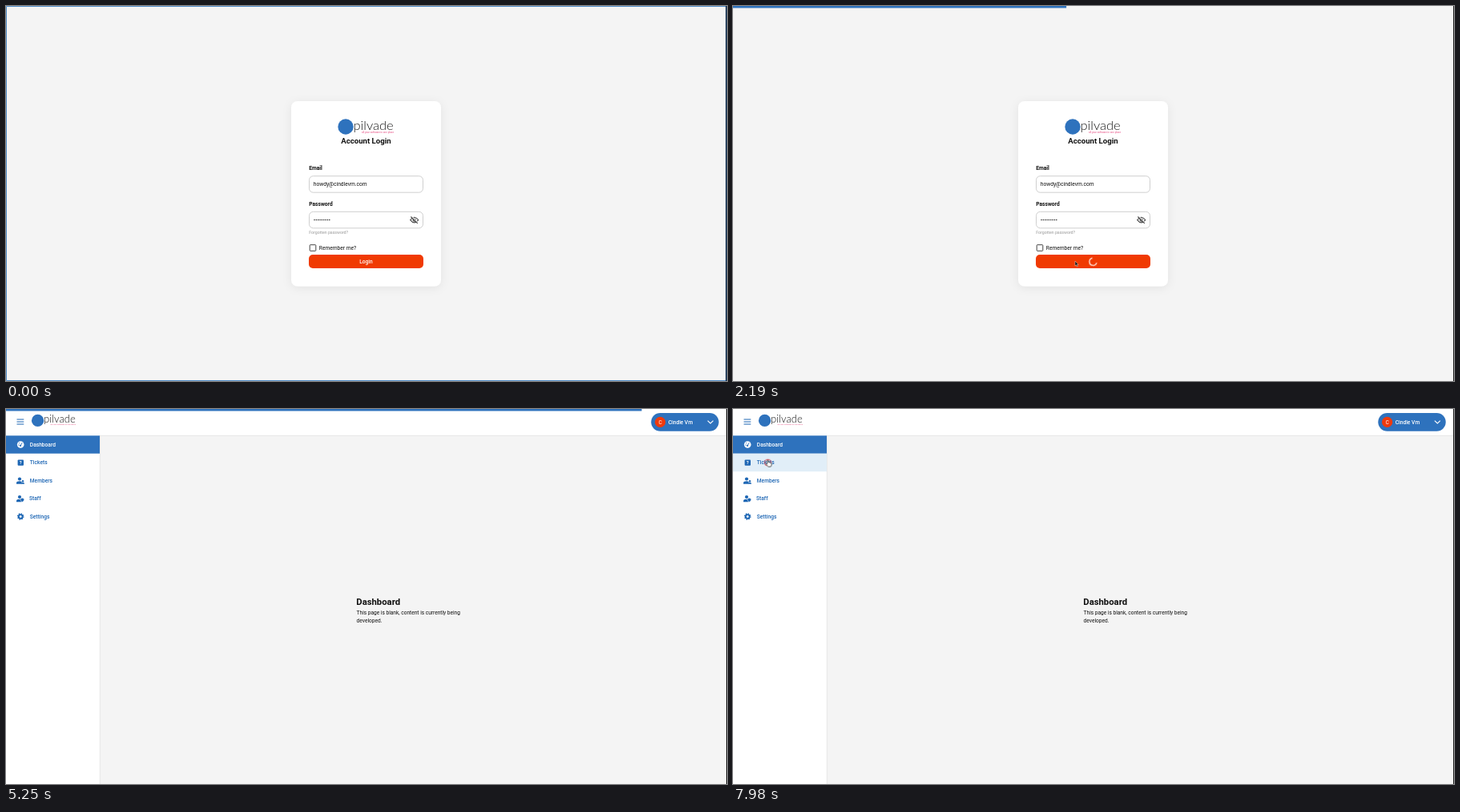
These frames come from a looping animation (900 px wide and 469 px high, 8000 ms). An HTML page:

```html
<!DOCTYPE html>
<html lang="en">
<head>
<meta charset="utf-8">
<title>Account login</title>
<style>
html, body { margin: 0; width: 100%; height: 100%; overflow: hidden; background: #f4f4f4; }
svg { display: block; width: 100vw; height: 100vh; }
text { font: 6.65px Roboto, Arial, sans-serif; fill: #111; white-space: pre; }
.b { font-weight: 700; }
.m { font-weight: 500; }
.word { font: 300 16.5px Lato, sans-serif; fill: #1c1c1c; }
.tag { font-size: 3.1px; fill: #e5487f; }
.blue { fill: #2e72bd; }
.link { font-weight: 500; fill: #1d66b4; }
.white { fill: #fff; }
.field { fill: #fff; stroke: #cfcfcf; }

/* one loop is 8 s, so 1% is 80 ms */
.a { animation: 8s linear infinite; }
.cut { animation: 8s step-end infinite; }

#login { animation-name: login; }
@keyframes login { 0% { visibility: visible } 59%, 100% { visibility: hidden } }
#home { animation-name: home; }
@keyframes home { 0% { visibility: hidden } 59%, 100% { visibility: visible } }
#edge { animation-name: edge; }
@keyframes edge { 0% { visibility: visible } 24.4%, 100% { visibility: hidden } }

#label { animation-name: label; }
@keyframes label { 0% { opacity: 1 } 24.4%, 100% { opacity: 0 } }
#busy { animation-name: busy; }
@keyframes busy { 0% { opacity: 0 } 24.4%, 100% { opacity: 1 } }
#spin { animation-name: spin; }
@keyframes spin { from { transform: rotate(-1811deg) } to { transform: rotate(1688deg) } }
#button { animation-name: button; }
@keyframes button {
  0%, 12% { fill: #f03a02 }
  15%, 24% { fill: #f4522a }
  26%, 100% { fill: #f03a02 }
}

#bar { animation-name: bar; }
@keyframes bar {
  0%, 24.4% { transform: scaleX(0); animation-timing-function: ease-out }
  33.75% { transform: scaleX(.983) }
  42.5%, 58.99% { transform: scaleX(1) }
  59% { transform: scaleX(.3); animation-timing-function: ease-out }
  65.6% { transform: scaleX(.881) }
  72%, 100% { transform: scaleX(1) }
}
#barFade { animation-name: barFade; }
@keyframes barFade { 0%, 74.2% { opacity: 1 } 75%, 100% { opacity: 0 } }

#staff { animation-name: staff; }
@keyframes staff { 0%, 83.8% { opacity: 0 } 84.6%, 87.3% { opacity: 1 } 89%, 100% { opacity: 0 } }
#members { animation-name: members; }
@keyframes members { 0%, 87.3% { opacity: 0 } 88.5%, 90.5% { opacity: 1 } 92%, 100% { opacity: 0 } }
#tickets { animation-name: tickets; }
@keyframes tickets { 0%, 90.5% { opacity: 0 } 92.5%, 100% { opacity: 1 } }

#px { animation-name: px; }
@keyframes px {
  0%, 3.75% { transform: translateX(3px); animation-timing-function: ease-in-out }
  12.5% { transform: translateX(418px); animation-timing-function: ease-out }
  16.5%, 23.6% { transform: translateX(425px) }
  26%, 65.9% { transform: translateX(427px); animation-timing-function: ease-in-out }
  73.5% { transform: translateX(852px) }
  75.4%, 76.25% { transform: translateX(853px); animation-timing-function: ease-in-out }
  84.4% { transform: translateX(60px); animation-timing-function: ease-out }
  92%, 100% { transform: translateX(43.5px) }
}
#py { animation-name: py; }
@keyframes py {
  0%, 3.75% { transform: translateY(3px); animation-timing-function: ease-in-out }
  12.5% { transform: translateY(316px) }
  16.5%, 23.6% { transform: translateY(317.5px) }
  26%, 65.9% { transform: translateY(319px); animation-timing-function: ease-in-out }
  73.5% { transform: translateY(48px) }
  75.4%, 76.25% { transform: translateY(49.5px); animation-timing-function: ease-in-out }
  80.5% { transform: translateY(246px); animation-timing-function: ease-in-out }
  84.4% { transform: translateY(115px) }
  89% { transform: translateY(86px); animation-timing-function: ease-out }
  93%, 100% { transform: translateY(63.8px) }
}
#pointer { animation-name: pointer; }
@keyframes pointer { 0% { opacity: 0 } 3.75% { opacity: 1 } 44.4% { opacity: 0 } 65.9%, 100% { opacity: 1 } }
#arrow { animation-name: arrow; }
@keyframes arrow { 0% { opacity: 1 } 12.2% { opacity: 0 } 25% { opacity: 1 } 83.6%, 100% { opacity: 0 } }
#hand { animation-name: hand; }
@keyframes hand { 0% { opacity: 0 } 12.2% { opacity: 1 } 25% { opacity: 0 } 83.6%, 100% { opacity: 1 } }
#ring { animation-name: ring; }
@keyframes ring { 0% { opacity: 0 } 23.6% { opacity: 1 } 25.5% { opacity: 0 } 99%, 100% { opacity: 1 } }
</style>
</head>
<body>
<svg viewBox="0 0 900 469">
  <defs>
    <filter id="soft" x="-20%" y="-20%" width="140%" height="140%">
      <feDropShadow dx="0" dy="2" stdDeviation="6" flood-color="#000" flood-opacity=".07"/>
    </filter>
    <g id="brand">
      <circle cx="10" cy="10" r="9.7" class="blue"/>
      <text class="word" x="19.5" y="13.5">pilvade</text>
      <text class="tag" x="30" y="17.6">all your software in one place</text>
    </g>
    <g id="person">
      <circle cx="-1" cy="-2.2" r="2.1"/>
      <path d="M-5 4V2.6Q-5 .6-1 .6 1 .6 1.6 1.2V4Z"/>
    </g>
  </defs>

  <rect width="900" height="469" fill="#f4f4f4"/>

  <g id="login" class="cut">
    <rect x="356" y="119" width="187" height="231.5" rx="8" fill="#fff" filter="url(#soft)"/>
    <use href="#brand" x="414" y="141"/>
    <text class="b" x="449.5" y="172" text-anchor="middle" style="font-size:9.6px">Account Login</text>

    <text class="b" x="378.3" y="205.3">Email</text>
    <rect class="field" x="378.5" y="212.7" width="142" height="20.5" rx="5"/>
    <text x="383.8" y="225.4">howdy@cindlevm.com</text>

    <text class="b" x="378.3" y="249.8">Password</text>
    <rect class="field" x="378.5" y="257.3" width="142" height="20.5" rx="5"/>
    <path d="M385 267.4H404" stroke="#222" stroke-width="1.5" stroke-linecap="round" stroke-dasharray="0 2.35"/>
    <g transform="translate(509.7 267.6)" fill="none" stroke="#444" stroke-width="1.1">
      <path d="M-5 0Q0-6.6 5 0 0 6.6-5 0Z"/>
      <circle r="1.6"/>
      <path d="M-3.6-4.6 4.6 3.6" stroke="#fff"/>
      <path d="M-4.2-4 4-4.2" stroke="none"/>
      <path d="M-4.3-4.1 4.1 4.3"/>
    </g>
    <text x="378.3" y="285" style="font-size:5.2px;fill:#999">Forgotten password?</text>

    <rect x="379.2" y="298.7" width="7.6" height="7.6" rx=".8" fill="#fff" stroke="#444"/>
    <text x="390.8" y="304.7">Remember me?</text>

    <rect id="button" class="a" x="378" y="311" width="143" height="17" rx="5"/>
    <text id="label" class="m white cut" x="449.5" y="322" text-anchor="middle" style="fill:#fff">Login</text>
    <g id="busy" class="cut">
      <g transform="translate(449.5 319.8)">
        <path id="spin" class="a" d="M-3.98 2.3A4.6 4.6 0 1 1 3.98 2.3" fill="none" stroke="#ffe9e2" stroke-width="1.3"/>
      </g>
    </g>
  </g>

  <g id="home" class="cut">
    <path d="M0 0H900V33H117V469H0Z" fill="#fff"/>
    <path d="M117 33.3H900M117.3 33V469" fill="none" stroke="#e2e2e2" stroke-width=".8"/>
    <path d="M13.5 13H22.3M13.5 16H22.3M13.5 19H22.3" stroke="#1d66b4" stroke-width="1.2"/>
    <use href="#brand" transform="translate(31.7 6.5) scale(.79)"/>

    <rect class="blue" x="805.3" y="5" width="84.4" height="22.7" rx="11.35"/>
    <circle cx="816.6" cy="16.4" r="6.6" fill="#f03a0c"/>
    <text x="816.6" y="18.7" text-anchor="middle" style="fill:#fff">C</text>
    <text class="m" x="826.7" y="18.6" style="fill:#fff">Cindle Vm</text>
    <path d="M875.8 14.6 879.3 18 882.8 14.6" fill="none" stroke="#fff" stroke-width="1.1"/>

    <rect class="blue" y="33.3" width="117" height="22.4"/>
    <g fill="#e1eef8">
      <rect id="tickets" class="a" y="55.8" width="117" height="22.4"/>
      <rect id="members" class="a" y="78.3" width="117" height="22.4"/>
      <rect id="staff" class="a" y="100.8" width="117" height="22.4"/>
    </g>

    <circle cx="18.2" cy="44.5" r="4.3" fill="#fff"/>
    <path d="M18 46 20 42.5M15.6 45H16.3M16.4 42.4 16.9 42.9" stroke="#2e72bd" stroke-width=".9" stroke-linecap="round"/>
    <circle class="blue" cx="18.1" cy="45.8" r="1.1"/>
    <rect x="14.6" y="63.4" width="7.4" height="7.4" rx="1" fill="#1d66b4"/>
    <text class="b" x="18.3" y="69.3" text-anchor="middle" style="font-size:6px;fill:#fff">?</text>
    <g fill="#1d66b4">
      <use href="#person" x="18" y="89.7"/>
      <circle cx="21" cy="90.3" r="1.2"/>
      <path d="M18.9 93.7Q18.9 91.8 21 91.8T23.1 93.7Z"/>
      <use href="#person" x="18" y="112.2"/>
      <path d="M20.3 111.3 22.6 112.2V113.7Q22.4 115.5 20.3 116.3 18.2 115.5 18 113.7V112.2Z" stroke="#fff" stroke-width=".5"/>
    </g>
    <g transform="translate(18.2 134.5)" fill="none" stroke="#1d66b4">
      <circle r="2.4" stroke-width="1.9"/>
      <circle r="3.6" stroke-width="1.4" stroke-dasharray="1.414"/>
    </g>

    <text class="m" x="29.8" y="46.9" style="fill:#fff">Dashboard</text>
    <text class="link" x="29.8" y="69.4">Tickets</text>
    <text class="link" x="29.8" y="91.9">Members</text>
    <text class="link" x="29" y="114.4">Staff</text>
    <text class="link" x="29.8" y="136.9">Settings</text>

    <text class="b" x="437.3" y="245" style="font-size:11.3px">Dashboard</text>
    <text x="437.6" y="256.8" style="font-size:6.58px">This page is blank, content is currently being</text>
    <text x="437.6" y="266.7" style="font-size:6.58px">developed.</text>
  </g>

  <g id="barFade" class="a">
    <rect id="bar" class="a blue" width="900" height="2.5"/>
  </g>
  <rect x="899" width="1" height="469" fill="#222"/>
  <g id="edge" class="cut">
    <path d="M900 .5H.5V468.5H900" fill="none" stroke="#4f8bc6"/>
    <rect x="898.3" width="1.7" height="469" fill="#14304f"/>
  </g>

  <g id="px" class="a"><g id="py" class="a"><g id="pointer" class="cut">
    <circle id="ring" class="cut" cy="3.3" r="4" fill="none" stroke="#e0323c" stroke-width=".9"/>
    <path id="arrow" class="cut" d="M0 0V6L1.4 4.8 2.4 7 3.3 6.6 2.4 4.5H4.2Z" fill="#111" stroke="#fff" stroke-width=".4"/>
    <path id="hand" class="cut" d="M-.8 4.6V.5Q0-.6.8.5V2.8Q1.8 2.2 2.2 3.2 3.2 2.8 3.5 3.7 4.6 3.6 4.6 4.6V6.2Q4.4 8.3 3 8.3H.6Q-.6 7.3-2.2 5.4-2 4-.8 5Z" fill="#fff" stroke="#222" stroke-width=".8"/>
  </g></g></g>
</svg>
</body>
</html>
```
